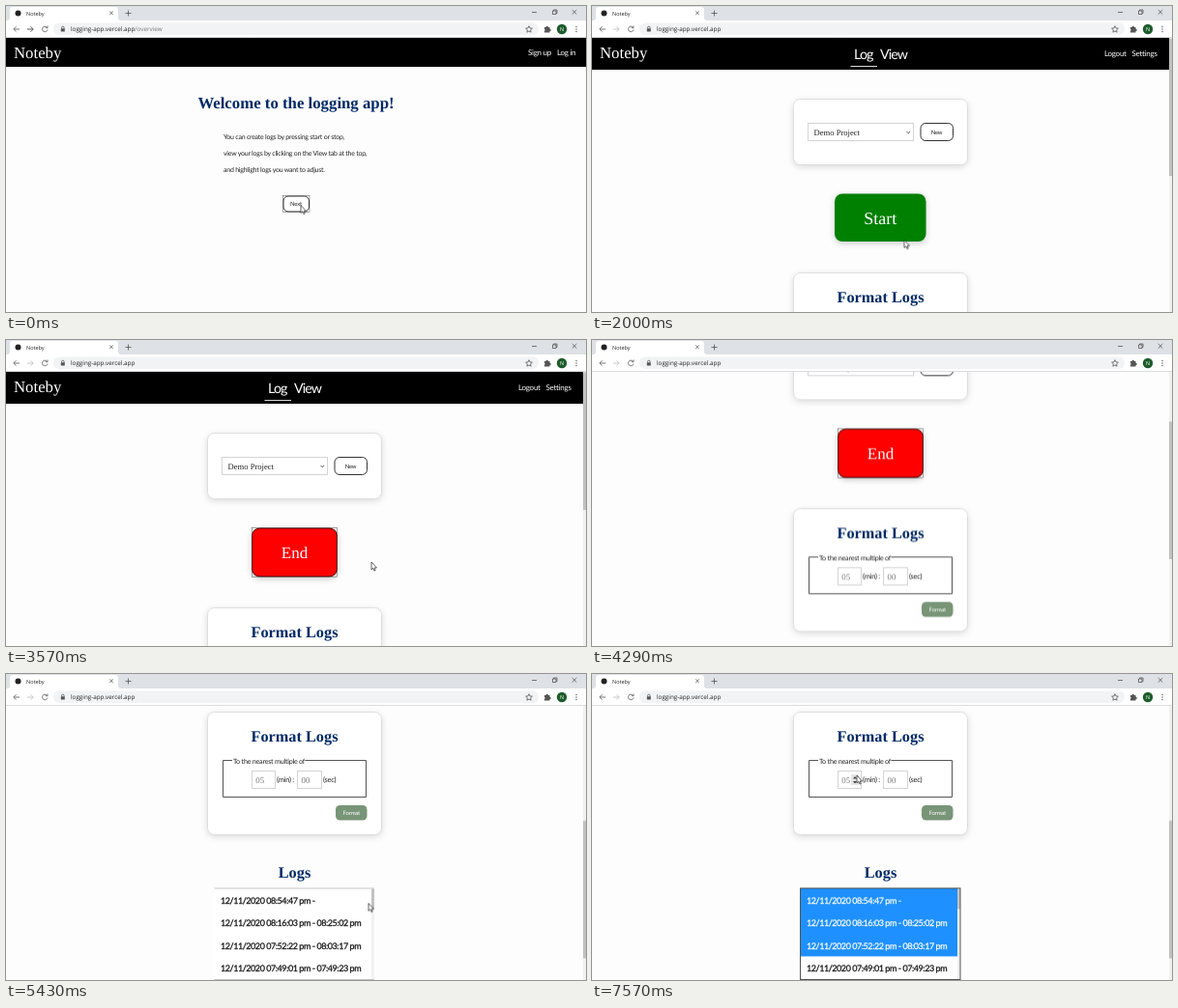
An HTML page for the animation above (8000 ms loop, 600x317 px).

```html
<!DOCTYPE html>
<html lang="en">
<head>
<meta charset="utf-8">
<title>Time log walkthrough</title>
<style>
html, body { margin: 0; width: 100%; height: 100%; overflow: hidden; background: #fdfdfd; }
svg { display: block; width: 600px; height: 317px; }
text { text-rendering: geometricPrecision; white-space: pre; }
.sans { font: 7px Lato, sans-serif; letter-spacing: -.034em; }
.small { font-size: 6px; }
.link { font-size: 8px; fill: #fff; }
.tab { font-size: 14.3px; letter-spacing: -.065em; fill: #fff; }
.serif { font: 16.8px "Liberation Serif", serif; }
.title { font-weight: bold; fill: #002a66; }
.mid { text-anchor: middle; }
.ui { font: 6.3px "Open Sans", sans-serif; fill: #222; }
.path { fill: #777; }
.entry { font-size: 9px; letter-spacing: -.05em; stroke-width: .25; }
.line { fill: none; stroke: #555; }
.btn { fill: #fff; stroke: #333; }
.focus { fill: none; stroke: #555; stroke-width: .5; }
.field { fill: #fff; stroke: #d4d4d4; }
.card { fill: #fff; stroke: #dedede; filter: drop-shadow(0 2px 3px #0002); }
.hint { font-size: 8.8px; fill: #777; }

/* One loop is 8 s, so 1% is 80 ms */
.on { animation: 8s step-end infinite; }
.move { animation: 8s steps(1) infinite; }
.welcome { animation-name: welcome; }
.account { animation-name: account; }
.app { animation-name: app; }
.before { animation-name: before; }
.loading { animation-name: loading; }
.shift { animation-name: shift; }
.start { animation-name: start; }
.end { animation-name: end; }
.lower { animation-name: lower; }
.scroll { animation-name: scroll; }
.thumb { animation-name: thumb; }
.pick1 { animation-name: pick1; }
.pick2 { animation-name: pick2; }
.pick3 { animation-name: pick3; }
.spin { animation-name: spin; }
.cursor { animation-name: cursor; }
.pointer { animation-name: pointer; }

@keyframes welcome { 0% { opacity: 1 } 1.75%, to { opacity: 0 } }
@keyframes account { 0% { opacity: 0 } 1.75% { opacity: 1 } 23.25%, to { opacity: 0 } }
@keyframes before { 0% { opacity: 1 } 23.25%, to { opacity: 0 } }
@keyframes app { 0% { opacity: 0 } 23.25%, to { opacity: 1 } }
@keyframes loading { 0% { opacity: 0 } 10.75%, to { opacity: 1 } }
@keyframes shift { 0% { transform: translateY(-17px) } 10.75%, to { transform: none } }
@keyframes start { 0% { opacity: 1 } 37.5%, to { opacity: 0 } }
@keyframes end { 0% { opacity: 0 } 37.5%, to { opacity: 1 } }
@keyframes lower { 0% { transform: translateY(-1px) } 37.5%, to { transform: none } }
@keyframes scroll {
  0% { transform: translateY(0) }
  46.45% { transform: translateY(0); animation-timing-function: steps(6) }
  57.125% { transform: translateY(-154px); animation-timing-function: steps(4) }
  64.25%, to { transform: translateY(-238px) }
}
@keyframes thumb {
  0% { transform: translateY(0) }
  46.45% { transform: translateY(0); animation-timing-function: steps(6) }
  57.125% { transform: translateY(76.5px); animation-timing-function: steps(4) }
  64.25%, to { transform: translateY(118.5px) }
}
@keyframes pick1 { 0% { opacity: 0 } 73.25%, to { opacity: 1 } }
@keyframes pick2 { 0% { opacity: 0 } 76.8%, to { opacity: 1 } }
@keyframes pick3 { 0% { opacity: 0 } 78.6%, to { opacity: 1 } }
@keyframes spin { 0% { opacity: 0 } 92.8%, to { opacity: 1 } }
@keyframes pointer { 0% { opacity: 1 } 48.25% { opacity: 0 } 64.25%, to { opacity: 1 } }
@keyframes cursor {
  0% { transform: translate(305px, 206.5px) }
  1.75% { transform: translate(305px, 206.5px); animation-timing-function: steps(5) }
  10.75% { transform: translate(323px, 242.5px) }
  23.25% { transform: translate(323px, 242.5px); animation-timing-function: steps(4) }
  30.375% { transform: translate(318px, 236.5px) }
  37.5% { transform: translate(318px, 236.5px); animation-timing-function: steps(4) }
  44.625% { transform: translate(378px, 230px) }
  48.25%, 67.875% { transform: translate(375px, 237.5px); animation-timing-function: steps(3) }
  73.25% { transform: translate(335px, 235px); animation-timing-function: steps(4) }
  80.375% { transform: translate(325px, 283px) }
  82.125% { transform: translate(325px, 283px); animation-timing-function: steps(7) }
  94.625%, to { transform: translate(274px, 105px) }
}
</style>
</head>
<body>
<svg viewBox="0 0 600 317" fill="#222">
  <defs>
    <text id="brand" class="serif" x="8" y="53.5" fill="#fff">Noteby</text>
    <text id="row1" class="sans entry" x="222" y="475.5">12/11/2020 08:54:47 pm -</text>
    <text id="row2" class="sans entry" x="222" y="499">12/11/2020 08:16:03 pm - 08:25:02 pm</text>
    <text id="row3" class="sans entry" x="222" y="522.5">12/11/2020 07:52:22 pm - 08:03:17 pm</text>
    <text id="row4" class="sans entry" x="222" y="545.5">12/11/2020 07:49:01 pm - 07:49:23 pm</text>
  </defs>
  <rect width="600" height="317" fill="#fdfdfd"/>

  <!-- Signed-out pages -->
  <g class="on before">
    <rect y="33" width="600" height="30" fill="#000"/>
    <use href="#brand"/>
    <text class="sans link" x="540" y="51">Sign up</text>
    <text class="sans link" x="570" y="51">Log in</text>
  </g>
  <g class="on welcome">
    <text class="serif title mid" x="300" y="106">Welcome to the logging app!</text>
    <g class="sans">
      <text x="225" y="137.5">You can create logs by pressing start or stop,</text>
      <text x="225" y="155">view your logs by clicking on the View tab at the top,</text>
      <text x="225" y="172">and highlight logs you want to adjust.</text>
    </g>
    <rect class="btn" x="287" y="197" width="26.5" height="16" rx="5"/>
    <rect class="focus" x="286.5" y="196.5" width="27.5" height="17"/>
    <text class="sans small mid" x="300" y="207">Next</text>
  </g>
  <g class="on account">
    <g class="serif title mid">
      <text x="300" y="106.5">Create an account, or use the</text>
      <text x="300" y="125.5">demo account.</text>
    </g>
    <g class="sans" style="font-size:7.2px">
      <text x="187.5" y="157">You'll need to create an account or use the demo account (a shared account)</text>
      <text x="187.5" y="166.5">to start making logs.</text>
      <text x="187.5" y="191">With your own account you can create projects to store logs in. With the demo</text>
      <text x="187.5" y="200.5">account, you won't be able to make new projects or update account settings,</text>
      <text x="187.5" y="210.5">but you can use the rest of the features.</text>
      <text class="on loading mid" x="300" y="227.5">Loading...</text>
    </g>
    <g class="on shift">
      <rect class="btn" x="265" y="245" width="33.5" height="16" rx="5"/>
      <rect class="btn" x="306.5" y="245" width="28.5" height="16" rx="5"/>
      <rect class="focus on loading" x="306" y="244.5" width="29.5" height="17"/>
      <text class="sans small mid" x="282" y="255.3">Sign Up</text>
      <text class="sans small mid" x="320.7" y="255.3">Demo</text>
    </g>
  </g>

  <!-- Signed-in page -->
  <g class="on app">
    <g class="move scroll">
      <rect y="33" width="597" height="33" fill="#000"/>
      <use href="#brand"/>
      <text class="sans tab" x="271" y="54.5">Log</text>
      <text class="sans tab" x="298" y="54.5">View</text>
      <path d="M267.5 62.5H295" stroke="#ddd"/>
      <text class="sans link" x="530" y="52">Logout</text>
      <text class="sans link" x="558.5" y="52">Settings</text>

      <rect class="card" x="208.5" y="96.5" width="180" height="68" rx="7"/>
      <rect class="field" x="223.5" y="121.5" width="109" height="18"/>
      <text class="serif" style="font-size:8.6px" x="229.5" y="133.5">Demo Project</text>
      <path class="line" d="M325.5 130l1.8 1.8 1.8-1.8"/>
      <rect class="btn" x="340" y="121.5" width="33.5" height="18" rx="5"/>
      <text class="sans small mid" x="356.5" y="133">New</text>

      <g class="on start">
        <rect x="251" y="194.5" width="94.5" height="49.5" rx="8" fill="#008000" style="filter:drop-shadow(0 2px 3px #0003)"/>
        <text class="serif mid" style="font-size:18px" x="298.3" y="225.5" fill="#fff">Start</text>
      </g>
      <g class="on end">
        <rect x="254.5" y="195" width="88" height="50" rx="8" fill="#f00" stroke="#400" style="filter:drop-shadow(0 2px 3px #0003)"/>
        <rect class="focus" x="254.3" y="194.7" width="88.4" height="50.6"/>
        <text class="serif mid" style="font-size:17px" x="298.5" y="225.5" fill="#fff">End</text>
      </g>

      <g class="on lower">
        <rect class="card" x="208.5" y="277.5" width="180" height="127" rx="7"/>
        <text class="serif title mid" style="font-size:16.3px" x="298.5" y="307.5">Format Logs</text>
        <path class="line" d="M234 327.5H224.5V365.5H372.5V327.5H309.5"/>
        <text class="sans" style="font-size:7.2px" x="235" y="330.5">To the nearest multiple of</text>
        <rect class="field" x="254.5" y="338.5" width="24" height="18"/>
        <rect class="field" x="301.5" y="338.5" width="25" height="18"/>
        <text class="serif hint" x="258.3" y="350.5">05</text>
        <text class="serif hint" x="305.5" y="350.5">00</text>
        <text class="sans" style="font-size:7.5px" x="280" y="350">(min) :</text>
        <text class="sans" style="font-size:7.5px" x="328" y="350">(sec)</text>
        <g class="on spin">
          <rect x="268" y="342" width="8" height="11" fill="#e4e4e4"/>
          <path d="M270 346.5l2-2.5 2 2.5zM270 349l2 2.5 2-2.5z" fill="#444"/>
        </g>
        <rect x="341" y="374" width="32.5" height="15.5" rx="4.5" fill="#789577"/>
        <text class="sans small mid" x="357.3" y="384" fill="#fff">Format</text>

        <text class="serif title mid" style="font-size:16.3px" x="298.5" y="448.5">Logs</text>
        <rect x="215.5" y="460" width="165.5" height="94.5" fill="#fff"/>
        <path d="M215.5 460H381M215.5 554.5H381" stroke="#c8c8c8"/>
        <g fill="#111" stroke="#111"><use href="#row1"/><use href="#row2"/><use href="#row3"/><use href="#row4"/></g>
        <g fill="#fff" stroke="#fff">
          <g class="on pick1"><path d="M216 460h162v24H216z" fill="#1e90ff" stroke="none"/><use href="#row1"/></g>
          <g class="on pick2"><path d="M216 483.5h162v24H216z" fill="#1e90ff" stroke="none"/><use href="#row2"/></g>
          <g class="on pick3"><path d="M216 507h162v23.5H216z" fill="#1e90ff" stroke="none"/><use href="#row3"/></g>
        </g>
        <rect x="378" y="460.5" width="3" height="93.5" fill="#f1f1f1"/>
        <rect x="378" y="460.5" width="3" height="21" fill="#c1c1c1"/>
        <rect class="line on pick1" x="215.5" y="460" width="165.5" height="94.5"/>
      </g>
    </g>
    <rect x="597" y="33" width="3" height="284" fill="#f1f1f1"/>
    <rect class="move thumb" x="597" y="33.5" width="3" height="142.5" fill="#c1c1c1"/>
  </g>

  <!-- Browser window -->
  <rect width="600" height="33" fill="#fff"/>
  <rect width="600" height="15" fill="#dee1e6"/>
  <path d="M1 15q3 0 3-3V4q0-3 3-3H113q3 0 3 3v8q0 3 3 3z" fill="#fff"/>
  <circle cx="12.5" cy="7.5" r="3" fill="#222"/>
  <text class="ui" style="font-size:5.5px" x="21" y="9.5">Noteby</text>
  <path d="M0 32.5H600" stroke="#dadce0"/>
  <rect x="49" y="17.5" width="502" height="12.5" rx="6.2" fill="#f1f3f4"/>
  <g class="line" stroke-width=".8">
    <path d="M107.2 5.5l3.6 3.6m0-3.6l-3.6 3.6M123.5 7.5h6m-3-3v6"/>
    <path d="M544 6.5h5M565.5 5h3.5v3.5h-3.5zM566.5 5V4h3.5v3.5h-1M585.7 4l4.6 4.6m0-4.6l-4.6 4.6"/>
    <path d="M14 24H8m2.5-2.7L7.8 24l2.7 2.7"/>
    <path d="M22 24h6m-2.5-2.7L28.2 24l-2.7 2.7" stroke="#bbb"/>
    <path class="on welcome" d="M22 24h6m-2.5-2.7L28.2 24l-2.7 2.7"/>
    <path d="M42.3 22A2.8 2.8 0 1 0 43 24.5M43 20.5v2.2h-2.2"/>
    <path d="M57.5 23.5v-1a1.3 1.3 0 0 1 2.6 0v1"/>
    <path d="M541 20.7l1 2.2 2.4.3-1.8 1.6.5 2.4-2.1-1.2-2.1 1.2.5-2.4-1.8-1.6 2.4-.3z"/>
  </g>
  <g fill="#555">
    <rect x="56.8" y="23.2" width="4" height="3.3" rx=".5"/>
    <path d="M557 22h1.5a1.2 1.2 0 0 1 2.4 0h1.6v1.7a1.2 1.2 0 0 1 0 2.4v1.4H557v-1.7a1.2 1.2 0 0 0 0-2.1z"/>
    <circle cx="590" cy="21.5" r=".7"/><circle cx="590" cy="24" r=".7"/><circle cx="590" cy="26.5" r=".7"/>
  </g>
  <circle cx="575" cy="24" r="5.2" fill="#1d5c2a"/>
  <text class="ui mid" style="font-size:5.5px;fill:#fff" x="575" y="26">N</text>
  <text class="ui on welcome" x="67" y="26">logging-app.vercel.app<tspan class="path">/overview</tspan></text>
  <text class="ui on account" x="67" y="26">logging-app.vercel.app<tspan class="path">/getting-started</tspan></text>
  <text class="ui on app" x="67" y="26">logging-app.vercel.app</text>

  <g class="on pointer">
    <path class="move cursor" d="M0 0V8L1.8 6.4 3 9.1 4.2 8.6 3 6H5.5z" fill="#fff" stroke="#222" stroke-width=".7"/>
  </g>
</svg>
</body>
</html>
```
